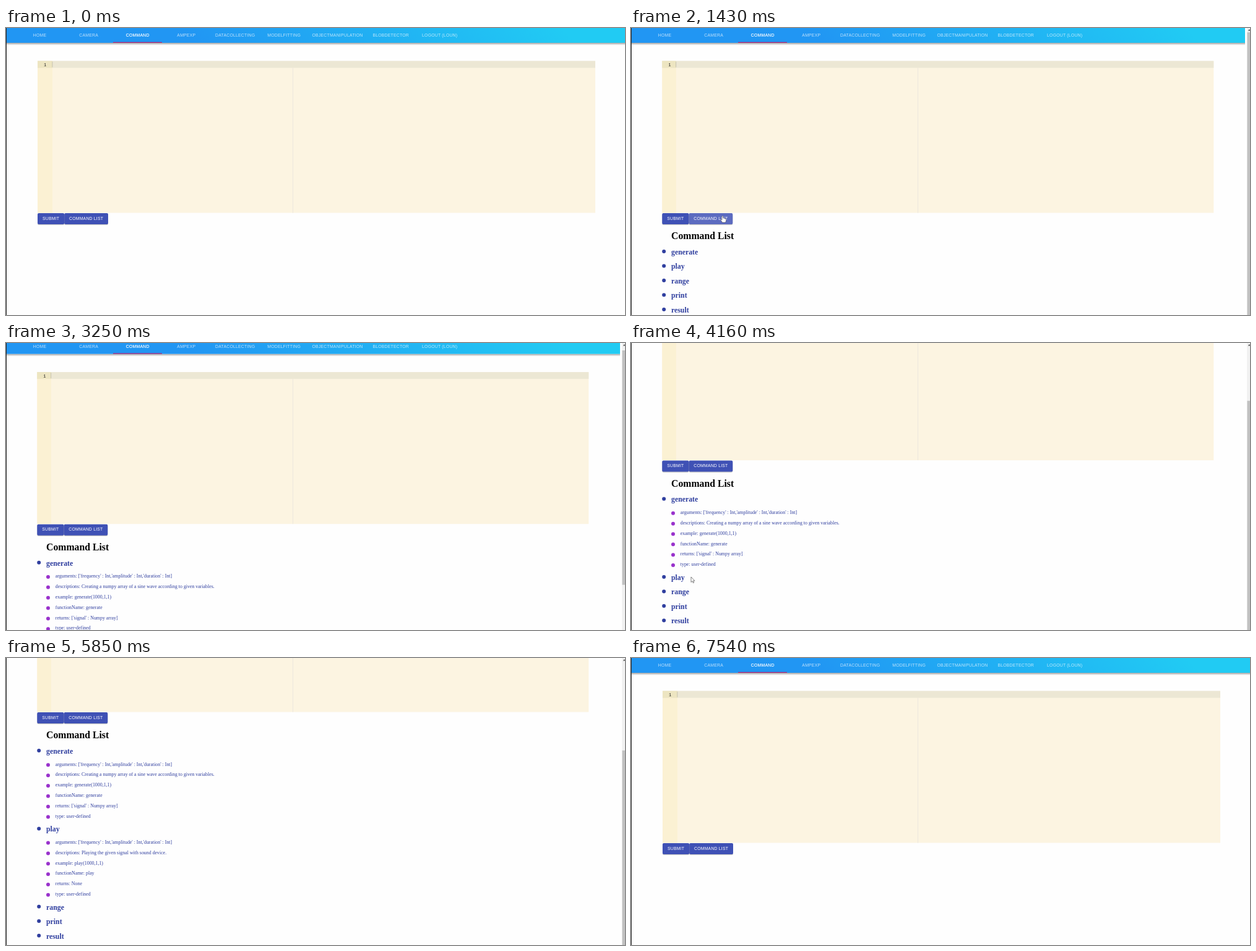
An HTML page for the animation above (8580 ms loop, 1000x465 px).

```html
<!DOCTYPE html>
<html lang="en">
<head>
<meta charset="utf-8">
<title>Command editor</title>
<style>
  html, body { margin: 0; width: 100%; height: 100%; overflow: hidden; background: #fefefe; }
  svg { display: block; width: 100vw; height: 100vh; }
  .ui { font: 6.9px "Liberation Sans", Arial, sans-serif; letter-spacing: .197px; fill: #fff; text-anchor: middle; }
  .num { font: 7px "Liberation Mono", monospace; fill: #222; text-anchor: middle; }
  .title { font: bold 15.77px "Liberation Serif", Times, serif; fill: #000; }
  .name { font: bold 11.82px "Liberation Serif", Times, serif; fill: #303f9f; }
  .detail { font: 7.88px "Liberation Serif", Times, serif; fill: #303f9f; }
</style>
</head>
<body>
<svg id="stage" viewBox="0 0 1000 465" preserveAspectRatio="none">
  <defs>
    <linearGradient id="sky" gradientUnits="userSpaceOnUse" x1="244" y1="268" x2="756" y2="-244">
      <stop offset=".3" stop-color="#2196f3"/><stop offset=".9" stop-color="#21cbf3"/>
    </linearGradient>
    <linearGradient id="shade" x2="0" y2="1">
      <stop stop-color="#000" stop-opacity=".36"/><stop offset="1" stop-color="#000" stop-opacity="0"/>
    </linearGradient>
  </defs>
  <g id="page"></g>
  <g id="bar"></g>
  <rect width="1" height="465" fill="#222"/>
  <g id="pointer"></g>
</svg>
<script>
const LOOP = 8580, STEP = 130;
const LIST_OPEN = 1300, GENERATE_OPEN = 1950, PLAY_OPEN = 4420, LIST_CLOSE = 7150;
const VIEW = 480, TRACK = 466, LINE = 16.85, ROW = 23.5;

const tabs = [["HOME", 54.5], ["CAMERA", 133.7], ["COMMAND", 212.7], ["AMPEXP", 291.3],
  ["DATACOLLECTING", 370.2], ["MODELFITTING", 449.2], ["OBJECTMANIPULATION", 535.5],
  ["BLOBDETECTOR", 621.7], ["LOGOUT (LOUN)", 700.7]];

const describe = (name, text, returns) => [
  "arguments: ['frequency' : Int,'amplitude' : Int,'duration' : Int]",
  `descriptions: ${text}`,
  `example: ${name}(1000,1,1)`,
  `functionName: ${name}`,
  `returns: ${returns}`,
  "type: user-defined"];

const commands = [
  { name: "generate", opens: GENERATE_OPEN, lines: describe("generate",
    "Creating a numpy array of a sine wave according to given variables.", "['signal' : Numpy array]") },
  { name: "play", opens: PLAY_OPEN, lines: describe("play",
    "Playing the given signal with sound device.", "None") },
  { name: "range" }, { name: "print" }, { name: "result" }];

// [time, scroll offset]
const scrollKeys = [[0, 0], [3120, 0], [3250, 6.3], [3640, 6.3], [4030, 109.5], [5330, 109.5],
  [5460, 125], [5850, 212], [7020, 212], [7150, 0]];

// pointer trips as [time, x, y]; it is hidden between them
const trips = [
  [[390, 430, 405], [1040, 147, 304], [1430, 147, 304], [1820, 92, 361], [2730, 92, 361]],
  [[3770, 92, 361], [4160, 97, 379], [4290, 84, 379], [4940, 84, 379]],
  [[6370, 300, 330], [6760, 126, 96], [7150, 126, 96], [7540, 330, 250]]];

function sample(keys, t, i) {
  if (t <= keys[0][0]) return keys[0][i];
  for (let k = 1; k < keys.length; k++) {
    const a = keys[k - 1], b = keys[k];
    if (t <= b[0]) {
      const u = (t - a[0]) / (b[0] - a[0]);
      return a[i] + (b[i] - a[i]) * u * u * (3 - 2 * u);
    }
  }
  return keys[keys.length - 1][i];
}

const rect = (x, y, w, h, fill, more = "") =>
  `<rect x="${x}" y="${y}" width="${w}" height="${h}" fill="${fill}" ${more}/>`;
const text = (kind, x, y, s, more = "") => `<text class="${kind}" x="${x}" y="${y}" ${more}>${s}</text>`;
const dot = (x, y, fill) => `<circle cx="${x}" cy="${y}" r="3" fill="${fill}"/>`;

function navbar(width) {
  return rect(0, 24, width, 4, "url(#shade)") + rect(0, 0, width, 24, "url(#sky)")
    + tabs.map(([s, x]) => text("ui", x, 14, s, s === "COMMAND" ? 'stroke="#fff" stroke-width=".15"' : 'opacity=".7"')).join("")
    + rect(173, 22.8, 79, 1.1, "#c51162");
}

function editor(left, right) {
  const gutter = left === 51 ? 24 : 22.5, top = 53.5;
  return rect(left, top, right - left, 246, "#fcf4e1")
    + rect(left, top, gutter, 246, "#fbf1d3")
    + rect(left, top, right - left, 11, "#ece7d4")
    + rect(left, top, gutter, 11, "#ede5c1")
    + rect(463, 64.5, 1, 235, "#ece7dc")
    + rect(left + gutter - .5, 54.5, .8, 9, "#bdb9aa")
    + text("num", left + 12, 62, "1");
}

function button(x, w, label, fill) {
  return rect(x, 301, w, 18.2, "#000", 'rx="2.5" opacity=".22"')
    + rect(x, 300, w, 18, fill, 'rx="2"')
    + text("ui", x + w / 2, 310.6, label);
}

function list(t) {
  let y = 366.9, out = text("title", 65, 342.4, "Command List");
  for (const { name, opens, lines } of commands) {
    out += dot(53.2, y - 4.8, "#303f9f") + text("name", 65, y, name);
    if (lines && t >= opens) {
      lines.forEach((s, i) => {
        const base = y + 19.6 + i * LINE;
        out += dot(68, base - 1.2, "#9932cc") + text("detail", 79.8, base, s);
      });
      y += 102.8;
    }
    y += ROW;
  }
  return out;
}

function scrollbar(t, scroll) {
  const height = 486 + 103 * ((t >= GENERATE_OPEN) + (t >= PLAY_OPEN));
  return rect(995, 0, 5, 465, "#f1f1f1")
    + rect(995.5, 7 + scroll * TRACK / height, 4.5, TRACK * VIEW / height, "#c1c1c1")
    + '<path d="M996.8 4.5L998.8 2L1000 3.5V4.5Z" fill="#505050"/>';
}

const arrow = '<path d="M0 0V8.6L2 6.8L3.4 9.8L4.8 9.2L3.4 6.3H6Z" fill="#fff" stroke="#333" stroke-width=".6"/>';
const hand = '<path d="M0 1Q.9 -.6 1.8 1V4Q3 3.2 3.6 4.4Q4.8 3.8 5.2 5Q6.6 4.8 6.6 6V8.6L5.6 11H.6L-2 7.2Q-2.2 5.8 -1 6.2L0 7Z" fill="#fff" stroke="#333" stroke-width=".5"/>';

function pointer(t) {
  const trip = trips.find(k => t >= k[0][0] && t < k[k.length - 1][0]);
  if (!trip) return "";
  const onButton = t >= 1040 && t <= 1430 || t >= 6760 && t < LIST_CLOSE;
  return `<g transform="translate(${sample(trip, t, 1)} ${sample(trip, t, 2)})">${onButton ? hand : arrow}</g>`;
}

function listButtonFill(t) {
  if (t >= LIST_OPEN && t < 1560 || t >= 7020 && t < LIST_CLOSE) return "#5c6bc0";
  if (t >= 1040 && t < LIST_OPEN || t >= 6760 && t < 7020) return "#303f9f";
  return "#3f51b5";
}

const part = id => document.getElementById(id);

function draw(t) {
  const open = t >= LIST_OPEN && t < LIST_CLOSE;
  const scroll = sample(scrollKeys, t, 1), left = open ? 50.3 : 51;
  part("page").setAttribute("transform", `translate(0 ${-scroll})`);
  part("page").innerHTML = navbar(open ? 992 : 1000) + editor(left, open ? 941.3 : 952)
    + button(left, 43.2, "SUBMIT", "#3f51b5")
    + button(left + 43.2, 70.8, "COMMAND LIST", listButtonFill(t))
    + (open ? list(t) : "");
  part("bar").innerHTML = open ? scrollbar(t, scroll) : "";
  part("pointer").innerHTML = pointer(t);
}

let shown = -1;
const start = performance.now();
function tick() {
  const t = Math.floor((performance.now() - start) % LOOP / STEP) * STEP;
  if (t !== shown) draw(shown = t);
  requestAnimationFrame(tick);
}
tick();
</script>
</body>
</html>
```
